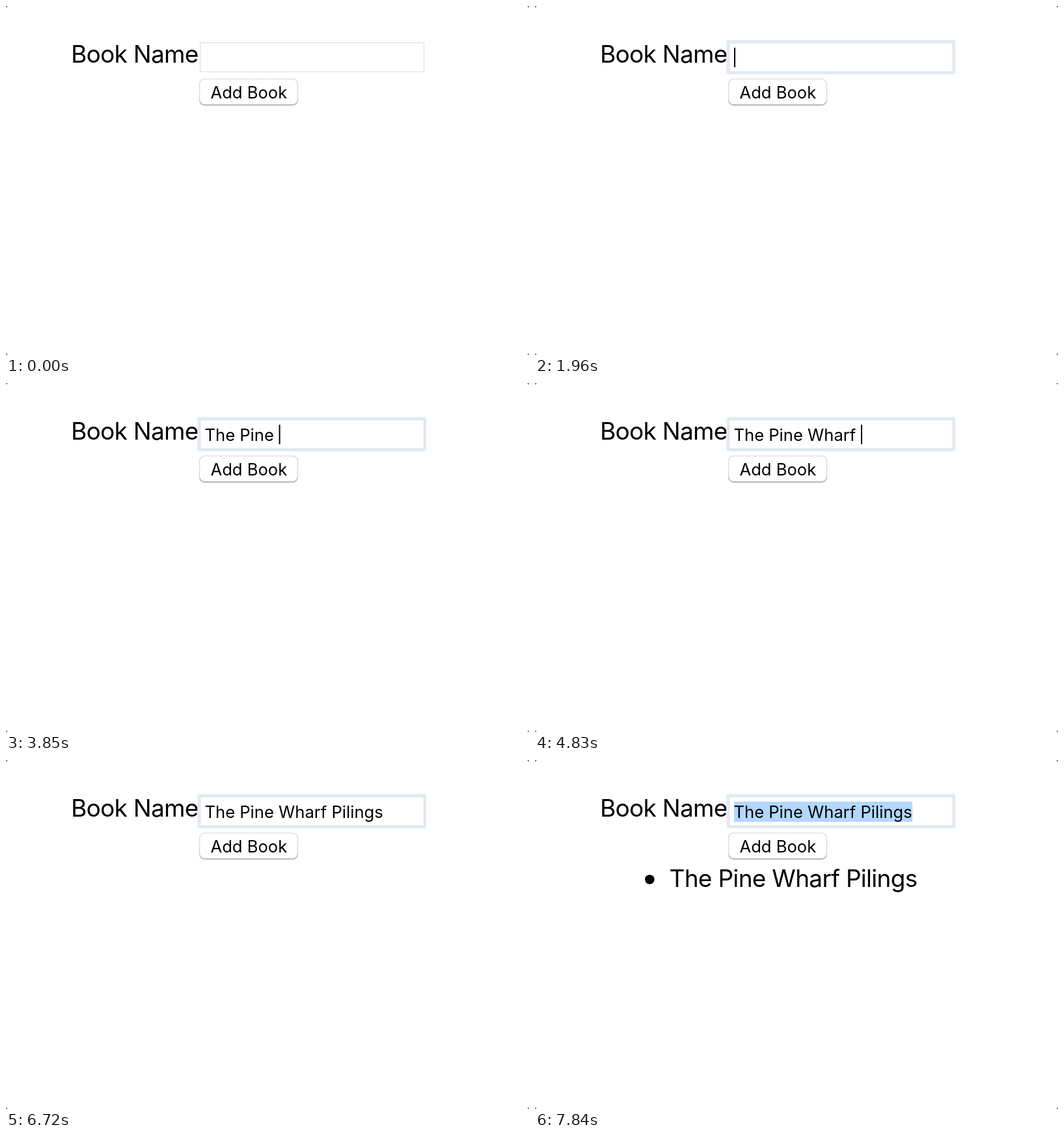
An HTML page that plays this animation: 804x536 px, repeating every 8 s.

```html
<!DOCTYPE html>
<html lang="en">
<head>
<meta charset="utf-8">
<title>Add Book</title>
<style>
html, body { margin: 0; width: 100%; height: 100%; overflow: hidden; background: #fff; }
svg { display: block; width: 100%; height: 100%; }
text { font-family: Inter, "Liberation Sans", sans-serif; fill: #000; white-space: pre; }
.large { font-size: 37px; letter-spacing: -0.7px; }
.small { font-size: 25.6px; }
</style>
</head>
<body>
<svg viewBox="0 0 804 536">
  <defs>
    <linearGradient id="edge" x1="0" y1="0" x2="0" y2="1">
      <stop offset="0" stop-color="#dedede"/>
      <stop offset=".75" stop-color="#d6d6d6"/>
      <stop offset="1" stop-color="#b4b4b4"/>
    </linearGradient>
  </defs>
  <rect width="804" height="536" fill="#fff"/>
  <path d="M0 0h3L0 3zM804 0h-3l3 3zM0 536h3l-3-3zM804 536h-3l3-3z" fill="#777"/>

  <text class="large" x="100" y="87">Book Name</text>

  <rect id="ring" x="296" y="54" width="348.5" height="49" rx="1.5" fill="none" stroke="#e1eaf6" stroke-width="3.5"/>
  <rect x="298.5" y="56.5" width="344" height="44.5" fill="#fff" stroke="#dcdcdc"/>
  <rect id="selection" x="306" y="64" height="31" fill="#b3d7ff"/>
  <text id="typed" class="small" x="305.5" y="89"></text>
  <rect id="caret" y="64" width="2" height="30"/>

  <rect x="296.8" y="111.5" width="152.4" height="41.5" rx="8.5" fill="url(#edge)"/>
  <rect x="298.2" y="112.8" width="149.6" height="38.2" rx="7.5" fill="#fff"/>
  <text class="small" x="314.5" y="142">Add Book</text>

  <g id="list">
    <circle cx="176.3" cy="183.5" r="7.3"/>
    <text id="item" class="large" x="206.5" y="195"></text>
  </g>
</svg>
<script>
const LOOP = 8000;
const TITLE = "The Pine Wharf Pilings";
const TEXT_X = 306;
const KEY_TIMES = [
  2380, 2590, 2590, 2800, 2940, 3150, 3290, 3710, 3850, 4200, 4270,
  4340, 4550, 4620, 4830, 5250, 5390, 5600, 5670, 5950, 6090, 6230
];
const FOCUS = 1960, CARET_OFF = 6720, BLUR = 6930, ADDED = 7000, REFOCUS = 7490, SELECT = 7840;

const $ = id => document.getElementById(id);
const [ring, selection, typed, caret, list, item] =
  ["ring", "selection", "typed", "caret", "list", "item"].map($);
const show = (el, on) => el.setAttribute("visibility", on ? "visible" : "hidden");
const within = (t, from, to) => t >= from && t < to;

item.textContent = TITLE;

function render(t) {
  const count = KEY_TIMES.filter(k => k <= t).length;
  typed.textContent = TITLE.slice(0, count);
  const width = count ? typed.getComputedTextLength() : 0;

  caret.setAttribute("x", TEXT_X + width);
  selection.setAttribute("width", width);
  show(caret, within(t, FOCUS, CARET_OFF));
  show(ring, within(t, FOCUS, BLUR) || t >= REFOCUS);
  show(list, t >= ADDED);
  show(selection, t >= SELECT);
}

const start = performance.now();
function tick() {
  render((performance.now() - start) % LOOP);
  requestAnimationFrame(tick);
}
tick();
</script>
</body>
</html>
```
